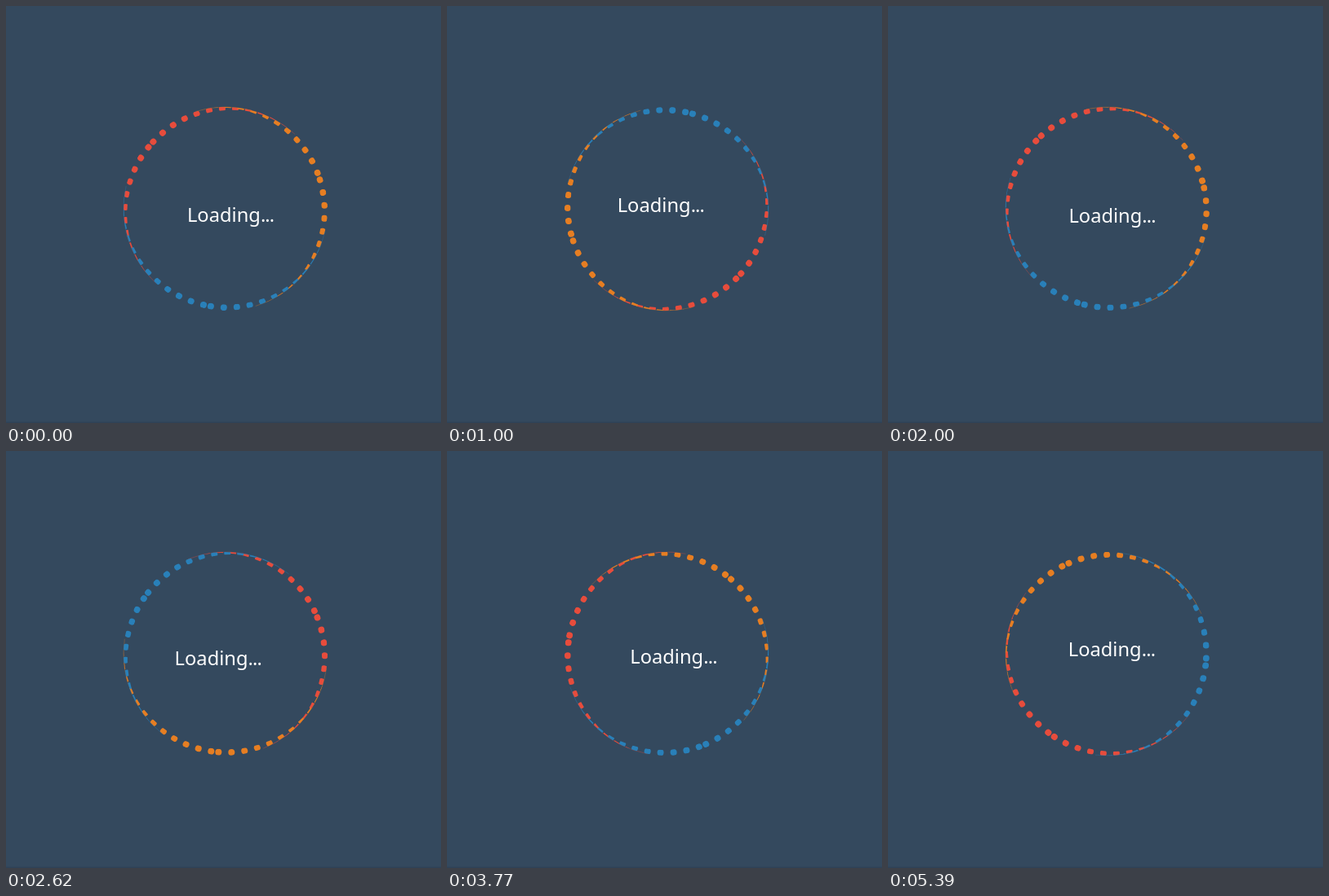
These frames come from a looping animation (533x512 px, 5470 ms). An HTML page:

```html
<!DOCTYPE html>
<html lang="en">
<head>
<meta charset="utf-8">
<title>Loading</title>
<style>
  html, body { margin: 0; width: 100%; height: 100%; overflow: hidden; background: #34495e; }
  svg { display: block; width: 533px; height: 512px; }
  text { font: 23.7px "Noto Sans", "Open Sans", sans-serif; fill: #fff; }
  .dots { letter-spacing: -0.85px; }
  .dot, .hair { fill: none; stroke: currentColor; }
  .dot { stroke-width: 8px; stroke-linecap: round; stroke-dasharray: 0.01 15.99; }
  .hair { stroke-width: 0.7px; opacity: 0.4; }
</style>
</head>
<body>
<svg viewBox="0 0 533 512">
  <defs>
    <clipPath id="crescent">
      <path d="M-125 0A125 125 0 0 1 125 0A125 117 0 0 0 -125 0Z"/>
    </clipPath>
    <g id="arc">
      <g clip-path="url(#crescent)">
        <path class="dot" d="M0 -121A125 121 0 0 1 125 0"/>
        <path class="dot" stroke-dashoffset="6.9" d="M0 -121A125 121 0 0 0 -125 0"/>
      </g>
      <path class="hair" d="M106 -66.2A125 125 0 0 1 125 0M-106 -66.2A125 125 0 0 0 -125 0"/>
    </g>
  </defs>
  <rect width="533" height="512" fill="#34495e"/>
  <rect y="510.5" width="533" height="1.5" fill="#2f4257"/>
  <g id="ring">
    <use href="#arc" color="#e74c3c"/>
    <use href="#arc" color="#e67e22" transform="rotate(120)"/>
    <use href="#arc" color="#2980b9" transform="rotate(240)"/>
  </g>
  <text id="label">Loading<tspan class="dots">...</tspan></text>
</svg>
<script>
  const LOOP = 5470, STEP = 77, LAST = 70;
  const START = 312.9, ORBIT = 9.23;
  // [step, degrees turned]: nearly constant speed with slight drift
  const TURN = [[0, 0], [13, 182.4], [26, 364.9], [34, 475.5], [49, 687.9], [60, 843.3], [70, 984]];
  const ring = document.getElementById('ring');
  const label = document.getElementById('label');

  function turned(k) {
    const i = Math.max(1, TURN.findIndex(p => p[0] >= k));
    const [k0, a0] = TURN[i - 1], [k1, a1] = TURN[i];
    return a0 + (a1 - a0) * (k - k0) / (k1 - k0);
  }

  function draw(ms) {
    const k = Math.min(LAST, Math.floor((ms % LOOP + 7) / STEP));
    const angle = START + turned(k);
    const rad = angle * Math.PI / 180;
    ring.setAttribute('transform', `translate(269 249) rotate(${angle})`);
    // the label rides opposite the red arc but stays upright
    label.setAttribute('x', 215.2 - ORBIT * Math.sin(rad));
    label.setAttribute('y', 259.2 + ORBIT * Math.cos(rad));
  }

  const t0 = performance.now();
  function tick() {
    draw(performance.now() - t0);
    requestAnimationFrame(tick);
  }
  tick();
</script>
</body>
</html>
```
